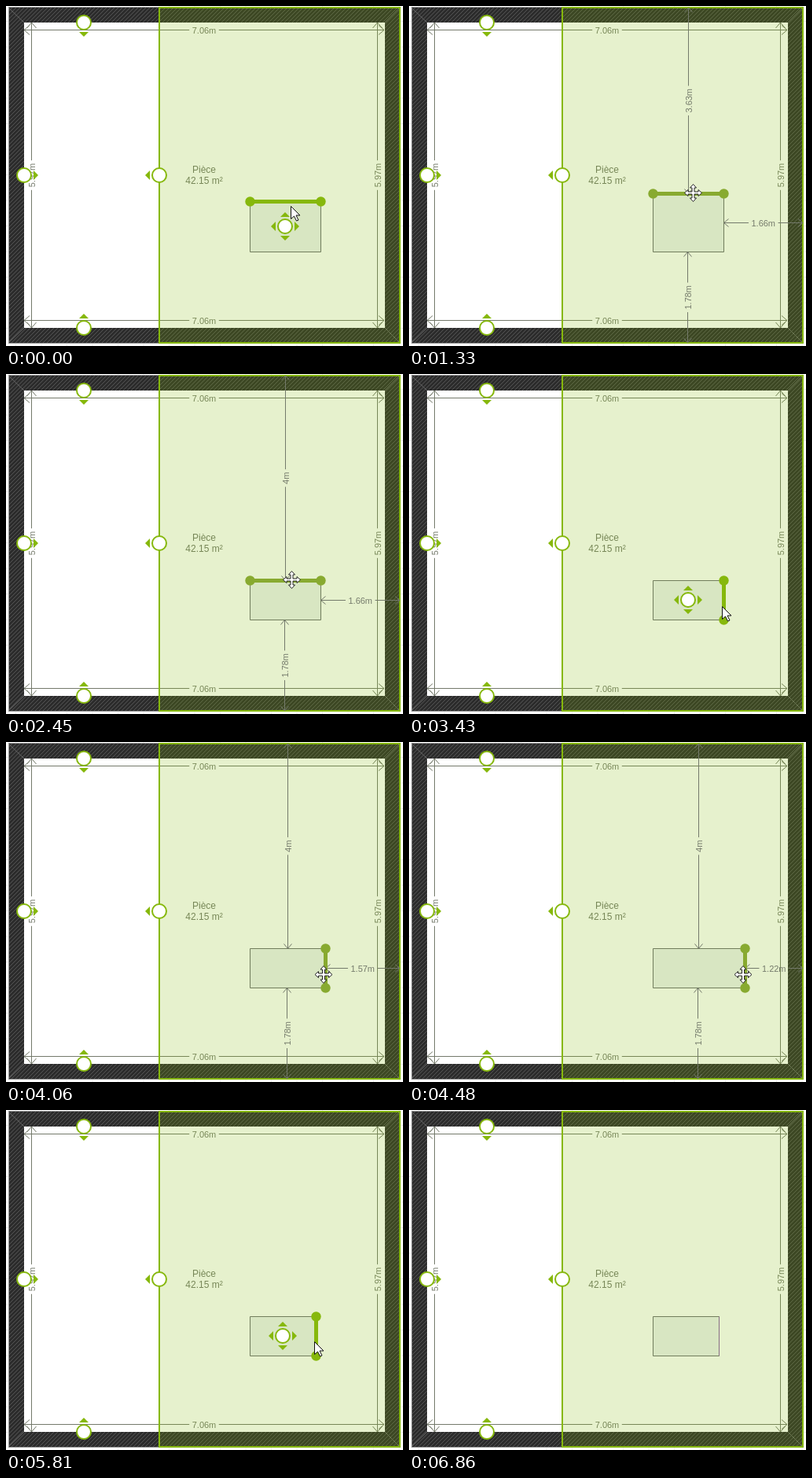
An HTML page with a canvas that plays this animation: 505 by 432 pixels, repeating every 7.28 s.

```html
<!DOCTYPE html>
<html lang="fr">
<head>
<meta charset="utf-8">
<title>Plan de pièce</title>
<style>
  html, body { margin: 0; width: 100%; height: 100%; overflow: hidden; background: #fff; }
  canvas { display: block; width: 505px; height: 432px; }
</style>
</head>
<body>
<canvas id="stage" width="505" height="432"></canvas>
<script>
const ctx = document.getElementById('stage').getContext('2d');
const LOOP = 7280, STEP = 70;
const GREEN = '#86b80c', DRAG_GREEN = '#88aa30', GREY = '#747a6b';
const LEFT = 310.5, BOTTOM = 312.5;
const FONT = '"Liberation Sans", Arial, sans-serif';

// Keyframes: [time, value...], linear in between.
const TOP_EDGE = [[910, 248.5], [1120, 245.5], [1330, 238.5], [1750, 210.5], [1820, 210.5], [2450, 262.5]];
const RIGHT_EDGE = [[3710, 400.5], [3920, 403.5], [4060, 406.2], [4480, 427.5], [4620, 437],
  [4690, 437], [5180, 410.5], [5460, 398], [5600, 394.5]];
const POINTER = [[70, 362, 254], [350, 362, 247], [2590, 363, 261], [3080, 399, 295],
  [5740, 392, 294], [6440, 392, 294], [6790, 459, 424]];

function sample(keys, t) {
  const next = keys.findIndex(key => key[0] > t);
  if (next === 0) return keys[0].slice(1);
  if (next < 0) return keys[keys.length - 1].slice(1);
  const a = keys[next - 1], b = keys[next];
  const p = (t - a[0]) / (b[0] - a[0]);
  return a.slice(1).map((v, i) => v + (b[i + 1] - v) * p);
}

// Pixel centres keep one-pixel lines crisp.
const snap = v => Math.floor(v) + 0.5;
const snapMid = (a, b) => Math.ceil((a + b) / 2) - 0.5;

function polygon(points, fill, stroke) {
  ctx.beginPath();
  points.forEach(([x, y]) => ctx.lineTo(x, y));
  ctx.closePath();
  ctx.fillStyle = fill;
  ctx.fill();
  if (stroke) {
    ctx.strokeStyle = stroke;
    ctx.lineWidth = 1;
    ctx.stroke();
  }
}

function line(x1, y1, x2, y2, color, width = 1) {
  ctx.beginPath();
  ctx.moveTo(x1, y1);
  ctx.lineTo(x2, y2);
  ctx.strokeStyle = color;
  ctx.lineWidth = width;
  ctx.stroke();
}

function text(label, x, y, size) {
  ctx.font = `${size}px ${FONT}`;
  ctx.textAlign = 'center';
  ctx.textBaseline = 'alphabetic';
  ctx.fillStyle = GREY;
  ctx.fillText(label, x, y);
}

// Dimension line with open arrowheads and a centred label; vertical ones read upwards.
function dimension(x, y, length, label, vertical, wing = 5) {
  ctx.save();
  ctx.translate(x, y);
  if (vertical) {
    ctx.translate(0, length);
    ctx.rotate(-Math.PI / 2);
  }
  ctx.font = `11px ${FONT}`;
  const gap = ctx.measureText(label).width / 2 + 3.5, mid = length / 2;
  line(0, 0, mid - gap, 0, GREY);
  line(mid + gap, 0, length, 0, GREY);
  for (const [tip, dir] of [[0, 1], [length, -1]]) {
    line(tip, 0, tip + dir * (wing + 1), -wing, GREY);
    line(tip, 0, tip + dir * (wing + 1), wing, GREY);
  }
  text(label, mid, 4.5, 11);
  ctx.restore();
}

function disc(x, y, r, fill, stroke) {
  ctx.beginPath();
  ctx.arc(x, y, r, 0, Math.PI * 2);
  ctx.fillStyle = fill;
  ctx.fill();
  if (stroke) {
    ctx.strokeStyle = stroke;
    ctx.lineWidth = 2;
    ctx.stroke();
  }
}

// White grip with green triangles; directions are quarter turns from "right".
function grip(x, y, directions) {
  for (const d of directions) {
    ctx.save();
    ctx.translate(x, y);
    ctx.rotate(d * Math.PI / 2);
    polygon([[12, -6], [18, 0], [12, 6]], GREEN);
    ctx.restore();
  }
  disc(x, y, 9, '#fff', GREEN);
}

function drawWalls() {
  ctx.save();
  ctx.beginPath();
  ctx.rect(3, 2, 498, 426);
  ctx.clip();
  ctx.fillStyle = '#2c2c2c';
  ctx.fillRect(3, 2, 498, 426);
  for (let s = 5; s < 930; s += 5) line(s, 0, s - 432, 432, '#606060', 0.8);
  ctx.restore();
  for (const [x1, x2] of [[3, 23], [501, 482]]) {
    line(x1, 2, x2, 21, '#666');
    line(x1, 428, x2, 409, '#666');
  }
  ctx.strokeStyle = '#999';
  ctx.lineWidth = 1;
  ctx.strokeRect(3.5, 1.5, 498, 427);
  ctx.fillStyle = '#fff';
  ctx.fillRect(23, 21, 459, 388);
}

function drawRoom() {
  ctx.fillStyle = '#fff';
  ctx.fillRect(0, 0, 505, 432);
  for (let y = 19.5; y < 432; y += 32.5) line(0, y, 505, y, '#ececec');
  for (let x = 12.5; x < 505; x += 32.5) line(x, 0, x, 432, '#ececec');
  drawWalls();

  for (const y of [30.5, 399.5]) dimension(23, y, 458, '7.06m', false, 6);
  for (const x of [32.5, 472.5]) dimension(x, 21, 388, '5.97m', true, 6);
  text('Pièce', 252, 212, 12);
  text('42.15 m²', 252, 226, 12);

  ctx.fillStyle = 'rgba(132, 183, 9, 0.2)';
  ctx.fillRect(195, 2, 306, 426);
  ctx.strokeStyle = GREEN;
  ctx.lineWidth = 2;
  ctx.strokeRect(195, 2, 306, 426);

  grip(99, 21, [1]);
  grip(99, 409, [3]);
  grip(23, 215, [0]);
  grip(195, 215, [2]);
}

function drawEdge(x1, y1, x2, y2, color) {
  line(x1, y1, x2, y2, color, 5);
  disc(x1, y1, 6.2, color);
  disc(x2, y2, 6.2, color);
}

function drawArrow(x, y) {
  ctx.save();
  ctx.translate(x + 0.5, y + 0.5);
  polygon([[0, 0], [0, 16], [4, 12.5], [7, 18.5], [9.5, 17.5], [6.5, 11.5], [11.5, 11.5]], '#fff', '#111');
  ctx.restore();
}

function drawMoveCursor(x, y) {
  const arm = [[-1.5, -6.5], [-4, -6.5], [0, -11], [4, -6.5], [1.5, -6.5], [1.5, -1.5]];
  const points = [];
  for (let q = 0; q < 4; q++) {
    const c = [1, 0, -1, 0][q], s = [0, 1, 0, -1][q];
    arm.forEach(([px, py]) => points.push([px * c - py * s, px * s + py * c]));
  }
  ctx.save();
  ctx.translate(x, y);
  polygon(points, '#fff', '#222');
  ctx.restore();
}

const metres = value => `${+value.toFixed(2)}m`;

function render(t) {
  const [rawTop] = sample(TOP_EDGE, t), [rawRight] = sample(RIGHT_EDGE, t);
  const top = snap(rawTop), right = snap(rawRight);
  const midX = snapMid(LEFT, right), midY = snapMid(top, BOTTOM);
  const dragTop = t >= 910 && t < 2660;
  const dragRight = t >= 3780 && t < 5810;
  const dragging = dragTop || dragRight;

  drawRoom();
  polygon([[LEFT, top], [right, top], [right, BOTTOM], [LEFT, BOTTOM]], '#d8e6c2', '#717d5c');
  if (t >= 6580) line(right, top, right, BOTTOM, '#866c84');

  if (dragging) {
    dimension(midX, 2, top - 2, metres((rawTop - 2.5) / 65), true);
    dimension(midX - 1, BOTTOM, 428 - BOTTOM, '1.78m', true);
    dimension(right, midY, 501 - right, metres((501 - rawRight) / 60.4), false);
  }
  const color = dragging ? DRAG_GREEN : GREEN;
  if (t < 2730) drawEdge(LEFT, top, right, top, color);
  if (t >= 3430 && t < 6580) drawEdge(right, top, right, BOTTOM, color);
  if (!dragging && t < 6580) grip(Math.floor(midX), Math.floor(midY), [0, 1, 2, 3]);

  if (dragTop) drawMoveCursor(snap(361.5 + Math.max(0, t - 1820) / 315), top - 1);
  else if (dragRight) drawMoveCursor(right - 2.5, 295.5);
  else if (t < 6860) drawArrow(...sample(POINTER, t).map(Math.round));
}

const start = performance.now();
function tick() {
  const t = (performance.now() - start) % LOOP;
  render(Math.floor(t / STEP) * STEP);
  requestAnimationFrame(tick);
}
tick();
</script>
</body>
</html>
```
